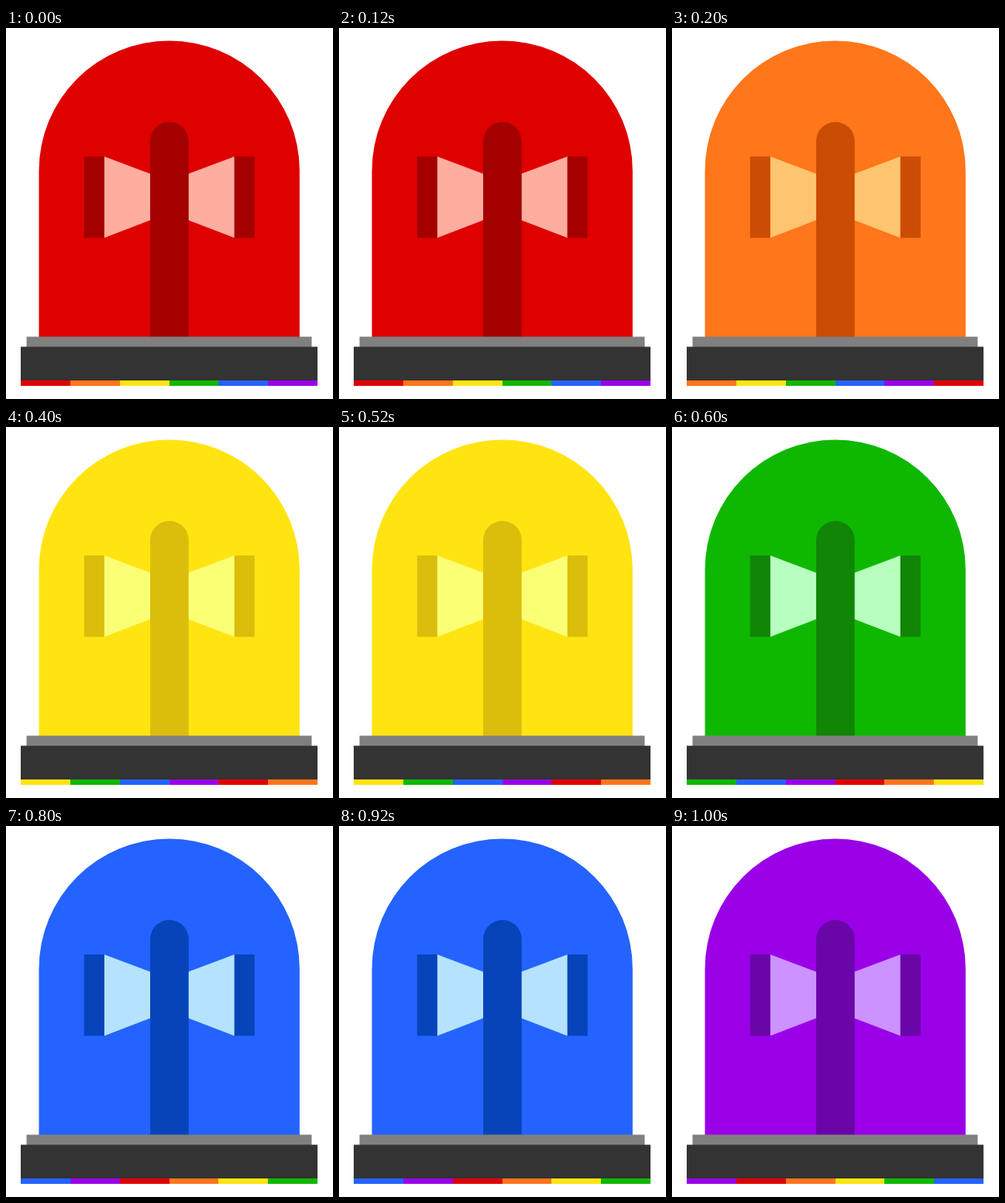
Write an HTML page that moves like this. It is 422 px wide and 480 px high and loops after 1.2 s.

```html
<!DOCTYPE html>
<html lang="en">
<head>
<meta charset="utf-8">
<title>Rainbow beacon</title>
<style>
  html, body { margin: 0; width: 100%; height: 100%; overflow: hidden; background: #fff; }
  svg { display: block; width: 100%; height: 100%; }
  .glass { fill: var(--glass); }
  .dark { fill: var(--dark); }
  .beam { fill: var(--beam); }
</style>
</head>
<body>
<svg id="beacon" viewBox="0 0 422 480">
  <path class="glass" d="M42.5 400V184.7a168.2 168.2 0 0 1 336.4 0V400z"/>
  <path class="beam" d="M126.8 166.3L186.5 188.8V248.6L126.8 271.6zM294.8 166.3L235 188.8V248.6L294.8 271.6z"/>
  <path class="dark" d="M100.8 166.3h26v105.3h-26zM294.8 166.3h26v105.3h-26z"/>
  <path class="dark" d="M186.1 400V146.4a24.8 24.8 0 0 1 49.6 0V400z"/>
  <rect x="26.5" y="399.4" width="368" height="14" fill="#808080"/>
  <rect x="19" y="412.4" width="383" height="44" fill="#333"/>
  <g id="strip" shape-rendering="crispEdges"></g>
</svg>
<script>
  const STEP = 200;
  const palette = [
    { glass: '#df0000', dark: '#a40000', beam: '#ffad9f' },
    { glass: '#ff761b', dark: '#cb4c04', beam: '#ffc46f' },
    { glass: '#ffe412', dark: '#dbbd0b', beam: '#fbff74' },
    { glass: '#0fb800', dark: '#108506', beam: '#b8ffbf' },
    { glass: '#2463ff', dark: '#0744ba', beam: '#b5e3ff' },
    { glass: '#9a00e8', dark: '#6a05a8', beam: '#cc92ff' }
  ];
  const count = palette.length;
  const beacon = document.getElementById('beacon');
  const strip = document.getElementById('strip');

  const edge = i => Math.round(19 + i * 383 / count);
  const cells = palette.map((_, i) => {
    const cell = document.createElementNS('http://www.w3.org/2000/svg', 'rect');
    cell.setAttribute('x', edge(i));
    cell.setAttribute('y', 456);
    cell.setAttribute('width', edge(i + 1) - edge(i));
    cell.setAttribute('height', 7);
    strip.append(cell);
    return cell;
  });

  function show(step) {
    for (const [part, color] of Object.entries(palette[step])) {
      beacon.style.setProperty('--' + part, color);
    }
    cells.forEach((cell, i) => cell.setAttribute('fill', palette[(step + i) % count].glass));
  }

  const start = performance.now();
  function tick() {
    const time = Math.max(0, performance.now() - start);
    show(Math.floor(time / STEP) % count);
    requestAnimationFrame(tick);
  }
  tick();
</script>
</body>
</html>
```
